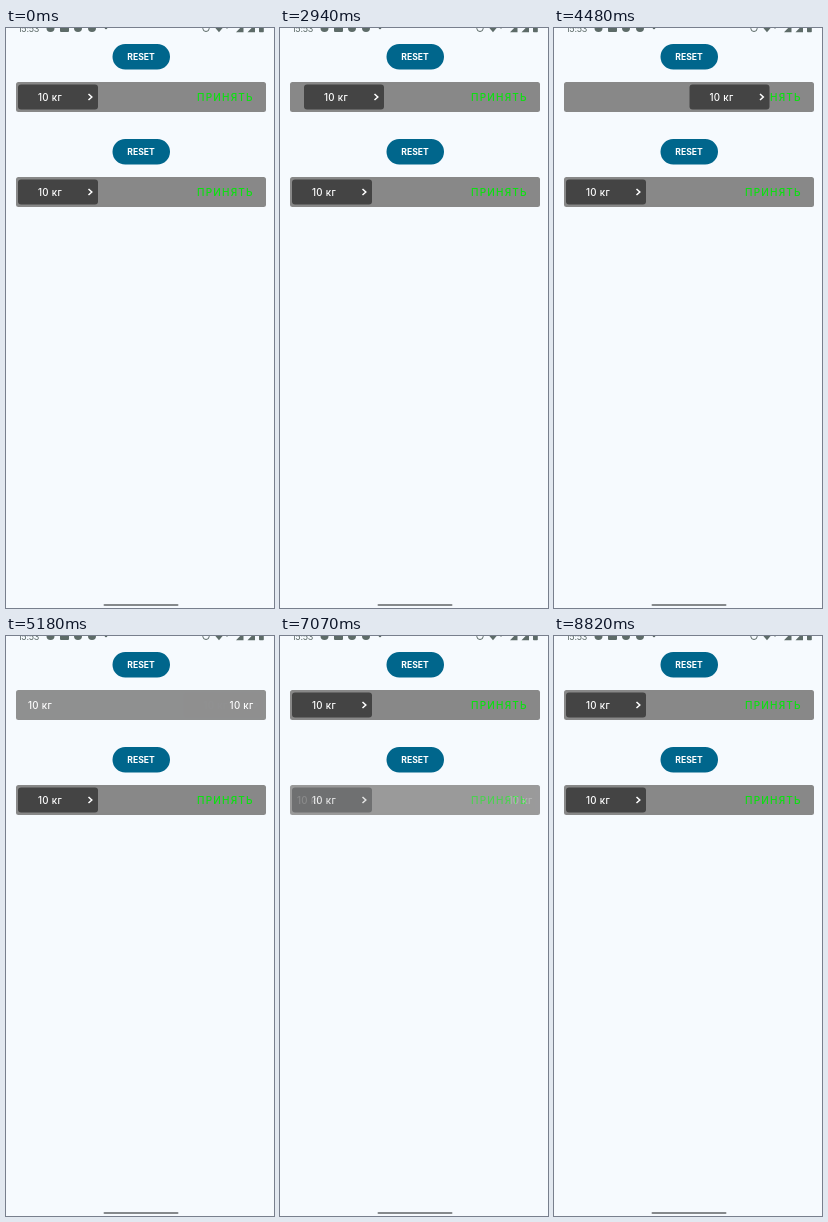
An HTML page for the animation above (9730 ms loop, 268 px wide and 580 px high).

```html
<!DOCTYPE html>
<html lang="ru">
<head>
<meta charset="utf-8">
<title>Swipe to accept</title>
<style>
  html, body { margin: 0; width: 100%; height: 100%; overflow: hidden; background: #f6fafe; }
  svg { display: block; width: 268px; height: 580px; font-family: Inter, "Noto Sans", sans-serif; }
  .weight { font-size: 9.7px; font-weight: 500; letter-spacing: .3px; fill: #fff; }
  .accept { font-size: 10px; font-weight: 500; letter-spacing: 1.2px; fill: #0be010; }
  .reset { font-size: 8.6px; font-weight: 700; fill: #fff; text-anchor: middle; }
  .status { fill: #5d6b68; }
  .clock { font-size: 9px; letter-spacing: -.3px; }
  .line { fill: none; stroke: #5d6b68; }
  .chevron { fill: none; stroke: #fff; stroke-width: 1.5; }
</style>
</head>
<body>
<svg viewBox="0 0 268 580">
  <rect width="268" height="580" fill="#f6fafe"/>
  <g class="status">
    <text class="clock" x="12" y="4">15:53</text>
    <circle cx="44.500" cy="0" r="4"/>
    <rect x="54" y="-4" width="9" height="8" rx="1"/>
    <circle cx="72" cy="0" r="4"/>
    <circle cx="86" cy="0" r="4"/>
    <circle cx="100" cy="0" r="1.300"/>
    <circle class="line" cx="200" cy="0.300" r="3.200"/>
    <path d="M208.500 -1L213 4.200L217.500 -1Z"/>
    <circle cx="221" cy="0" r=".7"/>
    <path d="M230 4.200L237.500 -3.500V4.200ZM241.500 4.200L249 -3.500V4.200Z"/>
    <rect x="253" y="-4" width="4.800" height="8.200" rx=".8"/>
  </g>
  <g id="rows"></g>
  <rect x="97.500" y="576" width="75" height="2" rx="1" fill="#85898c"/>
</svg>
<script>
const LOOP = 9730, STEP = 70, FADE = 300, HOME = 12, END = 177.5;

// Thumb keys are [ms, x]; accept and reset are the starts of the crossfades.
const rows = [
  { y: 0, accept: 4904, reset: 5744, press: 5600, full: .92, keys: [
    [1470, HOME], [1540, 24], [1610, 48], [1680, 70], [1750, 54], [1820, 27], [1890, HOME],
    [2870, HOME], [2940, 24], [3010, 62], [3080, 100], [3150, 122], [3220, 104], [3290, 62],
    [3360, 28], [3430, HOME],
    [4270, HOME], [4340, 30], [4410, 80], [4480, 135.5], [4550, 168], [4620, END],
    [5670, END], [5740, HOME]] },
  { y: 95, accept: 7007, reset: 8054, press: 7910, full: 1, keys: [
    [6580, HOME], [6650, 28], [6720, 80], [6790, 138], [6860, END], [6930, END], [7000, HOME]] }
];

const track = '<rect x="10" y="54" width="250" height="30" rx="2.5" fill="#888"/>';
const weight = x => `<text class="weight" x="${x}" y="72.600">10 кг</text>`;

document.getElementById('rows').innerHTML = rows.map(r => `
  <g transform="translate(0 ${r.y})">
    <rect x="106.500" y="16" width="57.500" height="25.500" rx="12.750" fill="#00668c"/>
    <rect class="glow" x="106.500" y="16" width="57.500" height="25.500" rx="12.750" fill="#fff"/>
    <text class="reset" x="135" y="32">RESET</text>
    <g class="slider">${track}
      <text class="accept" x="191" y="72.600">ПРИНЯТЬ</text>
      <g class="thumb">
        <rect y="56.500" width="80" height="25" rx="3" fill="#444"/>
        ${weight(20)}
        <path class="chevron" d="M70.500 66L73.800 69L70.500 72"/>
      </g>
    </g>
    <g class="done">${track}
      <g class="left">${weight(0)}</g>
      <g class="right">${weight(-24)}</g>
    </g>
  </g>`).join('');

[...document.getElementById('rows').children].forEach((el, i) => {
  for (const name of ['glow', 'slider', 'thumb', 'done', 'left', 'right'])
    rows[i][name] = el.querySelector('.' + name);
});

const clamp = v => Math.max(0, Math.min(1, v));

function along(keys, t) {
  const i = keys.findIndex(k => k[0] > t);
  if (i < 0) return keys[keys.length - 1][1];
  if (i === 0) return keys[0][1];
  const [t0, a] = keys[i - 1], [t1, b] = keys[i];
  return a + (b - a) * (t - t0) / (t1 - t0);
}

const moveX = (el, x) => el.setAttribute('transform', `translate(${x} 0)`);

function draw(r, t) {
  const shown = t < r.reset
    ? Math.min(r.full, clamp((t - r.accept) / FADE))
    : Math.min(r.full, 1 - clamp((t - r.reset) / FADE));
  const inset = 15.5 + 7 * shown;
  moveX(r.thumb, along(r.keys, t));
  moveX(r.left, inset);
  moveX(r.right, 269.5 - inset);
  r.slider.setAttribute('opacity', 1 - shown);
  r.done.setAttribute('opacity', shown);
  const p = t - r.press;
  r.glow.setAttribute('opacity', .12 * clamp(p / 210) * clamp((700 - p) / 280));
}

function tick() {
  const t = Math.floor(performance.now() % LOOP / STEP) * STEP;
  rows.forEach(r => draw(r, t));
  requestAnimationFrame(tick);
}
tick();
</script>
</body>
</html>
```
